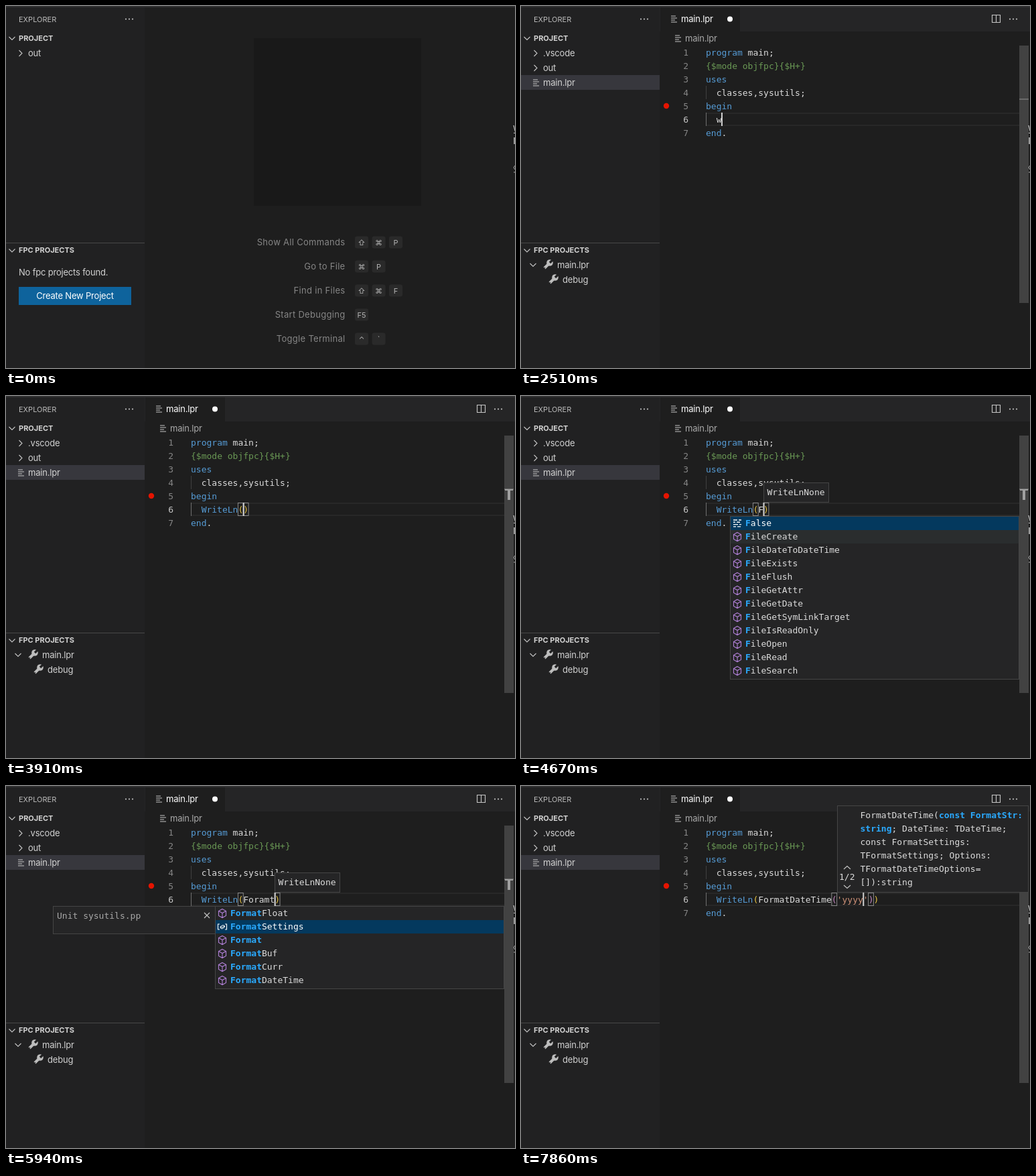
An HTML page for the animation above (8000 ms loop, 760x540 px).

```html
<!DOCTYPE html>
<html lang="en">
<head>
<meta charset="utf-8">
<style>
  html, body { margin: 0; width: 100%; height: 100%; overflow: hidden; background: #1e1e1e; }
  svg { display: block; width: 760px; height: 540px; }
  text { white-space: pre; }
  .ui { font: 13px Inter, sans-serif; letter-spacing: -.2px; }
  .head { font: 11px Inter, sans-serif; }
  .bold { font-weight: 700; }
  .hint { font: 13px Inter, sans-serif; letter-spacing: .3px; text-anchor: end; }
  .key { font: 11px Inter, "DejaVu Sans", sans-serif; text-anchor: middle; }
  .code { font: 13px "DejaVu Sans Mono", monospace; }
</style>
</head>
<body>
<svg id="stage" viewBox="0 0 760 540"></svg>
<script>
const LOOP = 8000, CHAR = 7.826, LEFT = 276, ROW = 20;
const FG = '#dcdcdc', BLUE = '#569cd6', GOLD = '#e8c545', PURPLE = '#c586c0',
      ORANGE = '#ce9178', GREEN = '#6a9955', MATCH = '#2aaaff';
const stage = document.getElementById('stage');

// drawing helpers
const esc = s => s.replace(/&/g, '&amp;').replace(/</g, '&lt;');
const rect = (x, y, w, h, fill, extra = '') =>
  `<rect x="${x}" y="${y}" width="${w}" height="${h}" fill="${fill}" ${extra}/>`;
const panel = (x, y, w, h) => rect(x + .5, y + .5, w - 1, h - 1, '#252526', 'stroke="#454545"');
const line = (d, color, width = 1) =>
  `<path d="${d}" fill="none" stroke="${color}" stroke-width="${width}"/>`;
const dot = (x, y, r, fill) => `<circle cx="${x}" cy="${y}" r="${r}" fill="${fill}"/>`;
const label = (cls, x, y, s, fill = '#d2d2d2', extra = '') =>
  `<text class="${cls}" x="${x}" y="${y}" fill="${fill}" ${extra}>${esc(s)}</text>`;
const span = (s, fill, bold) =>
  `<tspan fill="${fill}"${bold ? ' font-weight="700"' : ''}>${esc(s)}</tspan>`;
const code = (x, y, spans) => `<text class="code" x="${x}" y="${y}">${spans}</text>`;
const lineY = n => 39 + n * ROW;

// text between asterisks is shown as matched
const marked = (s, fill = FG) =>
  s.split('*').map((p, i) => p && span(p, i % 2 ? MATCH : fill, i % 2)).join('');

// icons
const right = (x, y) => line(`M${x - 2.5} ${y - 4.5}l4.5 4.5l-4.5 4.5`, '#c5c5c5', 1.1);
const down = (x, y) => line(`M${x - 4.5} ${y - 2}l4.5 4.5l4.5 -4.5`, '#c5c5c5', 1.1);
const dots = (x, y) => [0, 5, 10].map(d => dot(x + d, y, 1.1, '#c5c5c5')).join('');
const cross = (x, y) => line(`M${x - 4} ${y - 4}l8 8m0 -8l-8 8`, '#c5c5c5', 1.1);
const fileIcon = (x, y) =>
  line(`M${x} ${y - 4.5}h7m-7 3h9m-9 3h6m-6 3h9`, '#c5c5c5', 1.2);
const wrench = (x, y) =>
  line(`M${x - 5} ${y + 5}L${x + 2} ${y - 2}`, '#bdbdbd', 4) +
  dot(x + 3, y - 3, 4.8, '#bdbdbd') +
  line(`M${x + 3} ${y - 3}L${x + 8} ${y - 8}`, '#212122', 3.4) +
  dot(x - 4.6, y + 4.6, .9, '#333');
const cube = (x, y, c) =>
  line(`M${x} ${y - 6.5}l5.5 3v7l-5.5 3l-5.5 -3v-7zM${x - 5.5} ${y - 3.5}l5.5 3l5.5 -3M${x} ${y - .5}v7`, c, 1.1);
const variable = (x, y, c) =>
  line(`M${x - 4} ${y - 4}h-2.5v8h2.5M${x + 4} ${y - 4}h2.5v8h-2.5`, c, 1.1) +
  line(`M${x - 3} ${y}l4 -2.5l2.5 1.5v1.5l-4 2.5l-2.5 -1.5zl2.5 1.3l4 -2.6`, c);
const constant = (x, y, c) =>
  line(`M${x - 6} ${y - 5}h6m2 0h4m-12 3.3h3m2 0h5m-10 3.3h7m2 0h3m-12 3.3h4m2 0h5`, c, 1.4);
const ICONS = { '[': variable, '=': constant };

// completion lists; a leading [ or = picks the icon
const W_LIST = ['Word', 'WordBool', 'WordRec', 'WideChar', 'WideString', 'Write', 'WriteLn',
  'WriteStr', 'WideFormat', 'WideUpperCase', 'WideLowerCase', 'WrapText'].map(s => `*${s[0]}*${s.slice(1)}`);
const WRITE_LIST = ['*Write*', '*Write*Ln', '*Write*Str', '*Write*ComponentResFile', '*Write*Barrier',
  '[*Write*ErrorsToStdErr', '*Wi*deCompa*r*e*Te*xt', '*W*a*i*tFo*r*Thread*Te*rminate'];
const F_LIST = ['=*F*alse'].concat(['Create', 'DateToDateTime', 'Exists', 'Flush', 'GetAttr', 'GetDate',
  'GetSymLinkTarget', 'IsReadOnly', 'Open', 'Read', 'Search'].map(s => '*F*ile' + s));
const formats = stem => ['Float', 'Settings', '', 'Buf', 'Curr', 'DateTime']
  .map(s => (s === 'Settings' ? '[' : '') + stem + s);
const FORMAT_LIST = formats('*Format*');

// [time, line 6 with the caret as |, list, selected row]
const STEPS = [
  [1210, '|'],
  [2510, 'w|'], [2570, 'w|', W_LIST, 0], [2690, 'wr|', W_LIST, 0],
  [2890, 'wri|', WRITE_LIST, 0], [3010, 'writ|', WRITE_LIST, 0], [3070, 'write|', WRITE_LIST, 0],
  [3260, 'write|', WRITE_LIST, 1], [3320, 'WriteLn|'],
  [3910, 'WriteLn(|)'],
  [4610, 'WriteLn(F|)'], [4670, 'WriteLn(F|)', F_LIST, 0],
  [4790, 'WriteLn(Fo|)', formats('*Fo*rmat'), 0], [4910, 'WriteLn(For|)', formats('*For*mat'), 0],
  [5170, 'WriteLn(Fora|)', formats('*For*m*a*t'), 0],
  [5290, 'WriteLn(Foram|)', FORMAT_LIST, 0], [5480, 'WriteLn(Foramt|)', FORMAT_LIST, 0],
  ...[1, 2, 3, 4, 5].map(i => [5870 + i * 70, 'WriteLn(Foramt|)', FORMAT_LIST, i]),
  [6370, 'WriteLn(FormatDateTime|)'],
  [6690, 'WriteLn(FormatDateTime(|))'], [6880, "WriteLn(FormatDateTime('|'))"],
  ...[1, 2, 3, 4].map(i => [7340 + i * 130, `WriteLn(FormatDateTime('${'y'.repeat(i)}|'))`])
];
const CARET_OFF = [[880, 1210], [1650, 1980], [2310, 2510], [3580, 3910], [4280, 4610],
  [5740, 5940], [6630, 6690], [7270, 7470]];

function sidebar(ready) {
  let s = rect(0, 0, 207, 540, '#212122') +
    label('head', 19, 23.5, 'EXPLORER', '#bbbbbb') + dots(179, 19.5) +
    down(9, 48) + label('head bold', 19, 52, 'PROJECT') +
    rect(0, 353, 207, 1, '#484848') +
    down(9, 364.5) + label('head bold', 19, 368, 'FPC PROJECTS');
  if (!ready) {
    return s + right(22, 70.5) + label('ui', 33, 75, 'out') +
      label('ui', 19, 402, 'No fpc projects found.') +
      rect(19, 419, 168, 27, '#0e639c') +
      label('ui', 103, 437, 'Create New Project', '#ffffff', 'text-anchor="middle"');
  }
  return s + rect(0, 103, 207, 22, '#37373d') +
    right(22, 70.5) + label('ui', 33, 75, '.vscode') +
    right(22, 92.5) + label('ui', 33, 97, 'out') +
    fileIcon(18, 114.5) + label('ui', 33, 119, 'main.lpr') +
    down(18, 386) + wrench(40, 386) + label('ui', 54, 391, 'main.lpr') +
    wrench(48, 408) + label('ui', 62, 413, 'debug');
}

function welcome() {
  const hints = [['Show All Commands', '⇧⌘P'], ['Go to File', '⌘P'], ['Find in Files', '⇧⌘F'],
    ['Start Debugging', ['F5']], ['Toggle Terminal', '⌃`']];
  return rect(370, 48, 250, 250, '#191919') + hints.map(([name, keys], i) => {
    const y = 352.5 + i * 36;
    return label('hint', 506.5, y + 4.5, name, '#868686') + [...keys].map((k, j) => {
      const x = 531 + j * 25.5;
      return rect(x - 10, y - 9, 20, 18, '#2a2a2a', 'rx="3"') + label('key', x, y + 4, k, '#b4b4b4');
    }).join('');
  }).join('');
}

function typedLine(text) {
  const depthColors = [GOLD, PURPLE];
  let depth = 0;
  return (text.match(/'[^']*'|[()]|\w+/g) || []).map(tok => {
    if (tok === '(') return span(tok, depthColors[depth++]);
    if (tok === ')') return span(tok, depthColors[--depth]);
    if (tok[0] === "'") return span(tok, ORANGE);
    return span(tok, /^write(ln)?$/i.test(tok) ? BLUE : FG);
  }).join('');
}

function suggestions(list, selected) {
  return panel(312, 179, 432, list.length * ROW + 4) + list.map((item, i) => {
    const y = 180 + i * ROW, on = i === selected;
    const icon = ICONS[item[0]] || cube;
    const tint = on ? '#ffffff' : icon === variable ? '#75beff' : '#b180d7';
    const fill = on ? '#04395e' : i === 1 ? '#2a2d2e' : '';
    return (fill && rect(313, y, 430, ROW, fill)) + icon(323, y + 10, tint) +
      code(335, y + 14, marked(item.replace(/^[\[=]/, ''), on ? '#ffffff' : FG));
  }).join('');
}

function signature() {
  const rows = ['FormatDateTime(*const FormatStr:*', '*string*; DateTime: TDateTime;', 'const FormatSettings:',
    'TFormatSettings; Options:', 'TFormatDateTimeOptions=', '[]):string'];
  return panel(472, 29, 286, 130) +
    line('M482 124l5 -4.5l5 4.5M482 148l5 4.5l5 -4.5', '#c5c5c5', 1.1) +
    code(475, 140, span('1/2', FG)) +
    rows.map((r, i) => code(506.5, 48 + i * ROW, marked(r))).join('');
}

function editor(t) {
  const step = STEPS.filter(s => s[0] <= t).pop();
  const [, raw, list, selected] = step || [0, ''];
  const text = raw.replace('|', ''), startX = LEFT + 2 * CHAR;
  const current = step ? 6 : 3;
  const caretX = step ? startX + raw.indexOf('|') * CHAR : LEFT + 4 * CHAR;
  const top = lineY(current);

  let s = rect(207, 2, 553, 36, '#252526') + rect(208, 2, 119, 36, '#1e1e1e') +
    fileIcon(224, 19.5) + label('ui', 239, 24, 'main.lpr', '#ffffff') +
    (t < 2510 ? cross(312, 19.5) : dot(312, 19.5, 4, '#ffffff')) +
    line('M703.5 13.5h12v11h-12zM709.5 13.5v11', '#c5c5c5', 1.1) + dots(730, 19.5) +
    fileIcon(230, 48.5) + label('ui', 245, 53, 'main.lpr', '#a9a9a9');

  s += rect(LEFT, top, 468, 2, '#282828') + rect(LEFT, top + 18, 468, 2, '#282828');
  s += rect(LEFT, lineY(4), 1, ROW, '#404040') + rect(LEFT, lineY(6), 1, ROW, step ? '#707070' : '#404040');
  const lines = [span('program', BLUE) + span(' main;', FG), span('{$mode objfpc}{$H+}', GREEN),
    span('uses', BLUE), span('  classes,sysutils;', FG), span('begin', BLUE),
    '', span('end', BLUE) + span('.', FG)];
  lines.forEach((spans, i) => {
    const y = lineY(i + 1) + 15;
    s += code(242.2, y, span(String(i + 1), i + 1 === current ? '#c6c6c6' : '#858585')) + code(LEFT, y, spans);
  });
  s += dot(217, 149, 4.2, '#e51400');

  const open = text.lastIndexOf('('), close = text.indexOf(')');
  if (open >= 0) {
    for (const col of [open, close])
      s += rect(startX + col * CHAR, 159.5, CHAR, 19, 'none', 'stroke="#888888"');
  }
  s += code(startX, 174, typedLine(text));
  if (!CARET_OFF.some(([a, b]) => t >= a && t < b)) s += rect(caretX - .5, top, 2, ROW, '#d0d0d0');

  s += rect(744, 59, 14, 384, '#424242') + rect(744, step ? 138 : 90, 14, 2, '#6a6a6a');
  if (open >= 0) s += rect(745, 139, 12, 2, '#a0a0a0') + rect(749, 139, 4, 16, '#a0a0a0');

  if (t >= 4030 && t < 6690) {
    const x = Math.round(caretX);
    s += panel(x, 129, 98, 30) + code(x + 5.5, 148, span('WriteLnNone', FG));
  }
  if (list && t >= 4970) {
    s += panel(70, 179, 243, 42) + code(76, 198, span('Unit sysutils.pp', '#a8a8a8')) + cross(300, 193);
  }
  if (list) s += suggestions(list, selected);
  if (t >= 6750) s += signature();
  return s;
}

// slivers of the neighbouring pane at the right edge
const edge = label('ui', 757, 188, 'W', '#cccccc') + rect(758, 189, 2, 1, '#cccccc') +
  rect(758, 196, 2, 10, '#9a9a9a') + line('M760 238l-2 3l2 3m-2 4h2', '#b0b0b0');

let shown = '';
function render(t) {
  const art = rect(0, 0, 760, 540, '#1e1e1e') + sidebar(t >= 380) +
    (t < 500 ? welcome() : editor(t)) + rect(0, 0, 760, 2, '#303031') + edge;
  if (art !== shown) stage.innerHTML = shown = art;
}

const start = performance.now();
function tick() {
  render((performance.now() - start) % LOOP);
  requestAnimationFrame(tick);
}
tick();
</script>
</body>
</html>
```
